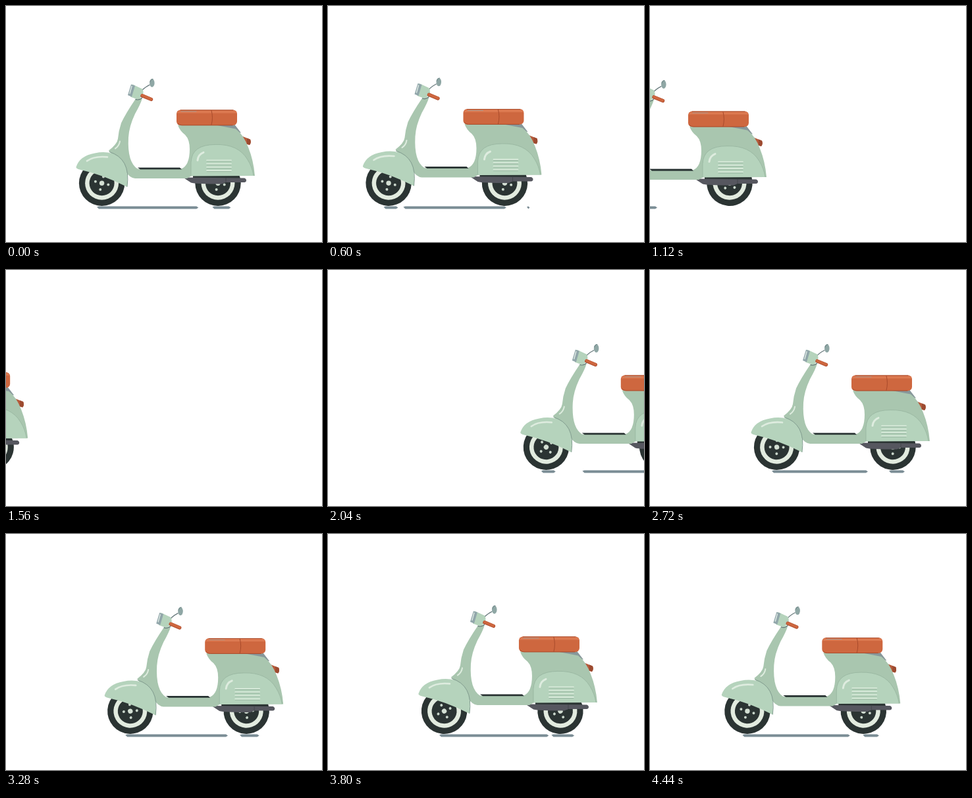
Write an HTML page that moves like this. It is 480x360 px and loops after 4.48 s.

```html
<!DOCTYPE html>
<html lang="en">
<head>
<meta charset="utf-8">
<title>Scooter</title>
<style>
  html, body { margin: 0; width: 100%; height: 100%; overflow: hidden; background: #fff; }
  svg { display: block; width: 100%; height: 100%; }
</style>
</head>
<body>
<svg viewBox="0 0 480 360">
  <defs>
    <g id="wheel">
      <circle r="34.7" fill="#2b3433"/>
      <circle r="25.5" fill="#e2ebdf"/>
      <circle r="19" fill="#2b3433"/>
      <circle r="3.7" fill="#d3dfd3"/>
      <g id="bolts" fill="#c9d6cb"></g>
    </g>
  </defs>
  <g id="scooter">
    <path id="shadow" fill="#7b8d95"/>
    <g transform="translate(145.6 270.2)"><use class="wheel" href="#wheel"/></g>
    <g transform="translate(322 270.2)"><use class="wheel" href="#wheel"/></g>
    <g id="body" fill="none" stroke-linecap="round">
      <!-- exhaust -->
      <path fill="#2b3433" d="M284 257H352V264H284Z"/>
      <path fill="#56575f" d="M269 261L281 269Q288 271 328 271L334 268.5H362Q365 268 365 265.5T362 262Z"/>
      <path stroke="#44464d" d="M334 262V268"/>
      <!-- tail light and seat base -->
      <path fill="#b65a3a" d="M356 197L371 203Q373 208 370 211.5L361 209Z"/>
      <path fill="#9c4a30" d="M366 201L371 203Q373 208 370 211.5L366 210Z"/>
      <path fill="#87979a" d="M300 180H347L357 193L330 190Z"/>
      <!-- frame -->
      <path fill="#a9c6af" d="M197 141L207 140Q205 148 196 164Q187 183 186 200Q184 238 200 248H266
        Q279 243 279 218Q279 203 272 196Q264 190 261 181H318L349 187Q361 196 368 215
        Q376 235 378 258.5H282L275 262.5H196Q188 262 180 250L156 220Q169 210 170 202
        Q171 190 175 178Q182 163 197 141Z"/>
      <path fill="#263030" d="M200 246H264L267 248.8H204Z"/>
      <!-- side cowl -->
      <path fill="#b5d3bc" d="M281 259V238Q282 211 318 211Q353 210 367 234Q374 245 376 258.5Z"/>
      <path stroke="#9bb9a3" d="M281 258V238Q282 211 318 211Q353 210 367 234Q374 245 376 258"/>
      <path stroke="#deecdf" stroke-width="3" d="M291 235Q292 226 300 223"/>
      <g id="louvers"></g>
      <!-- front fender -->
      <path fill="#b5d3bc" d="M106.5 245Q112 228 135 224Q158 219 173 231Q187 245 184 275.5
        Q148 257 112 249Q106 247.5 106.5 245Z"/>
      <path stroke="#829d90" d="M157 222Q173 227 180 240Q187 253 184 275"/>
      <path stroke="#deecdf" stroke-width="2.6" d="M123 236Q134 228 154 230"/>
      <path stroke="#deecdf" stroke-width="2" d="M166 217Q172 213 173 206"/>
      <!-- seat -->
      <rect x="259" y="158" width="92" height="23.7" rx="6" fill="#ce673f"/>
      <path fill="#dc7950" d="M260 163Q261 158.5 266 158.5H345Q350 159 350.5 163Z"/>
      <path stroke="#a84a2b" d="M265 158.5H345M312 159Q315 170 312 181M261 179Q263 181.5 267 181.5H344"/>
      <path stroke="#a9968b" d="M266 160.5H289"/>
      <!-- handlebar, lamp and mirror -->
      <path stroke="#65777a" stroke-width="1.2" d="M203 133Q208 125 218 120M197 142Q203 144 207 139"/>
      <ellipse cx="221.8" cy="117" rx="3.8" ry="6.3" fill="#8fa7a5"/>
      <path stroke="#6c8284" d="M219 115Q220 111 223 111"/>
      <path fill="#b5d3bc" d="M192 119L207 126Q211 133 205 139L200 142L189 138Z"/>
      <path fill="#91a6aa" d="M190 119L196 121L191 138L185 135.5Z"/>
      <path stroke="#dce8e3" stroke-width="1.5" d="M191 122L188 133"/>
      <path stroke="#ad4b2d" stroke-width="5.4" d="M207 136.3L220.5 142"/>
      <path stroke="#ce673f" stroke-width="4" d="M207 136L220.5 141.7"/>
    </g>
  </g>
</svg>
<script>
const LOOP = 4480, STEP = 40, RADIUS = 34.7, EXIT = 1720;
const $ = id => document.getElementById(id);
const scooter = $('scooter'), body = $('body'), shadow = $('shadow');
const wheels = document.querySelectorAll('.wheel');

const clamp = v => Math.min(1, Math.max(0, v));
const ease = v => (1 - Math.cos(Math.PI * clamp(v))) / 2;

function add(parent, tag, attributes) {
  const node = document.createElementNS('http://www.w3.org/2000/svg', tag);
  for (const name in attributes) node.setAttribute(name, attributes[name]);
  parent.append(node);
}

// Pulls away smoothly to a constant speed.
function leaving(t) {
  const ramp = 170, distance = time => ramp * Math.log(1 + Math.exp((time - 507) / ramp));
  return -0.33 * (distance(t) - distance(0));
}

// Brakes on entry, then creeps on to the starting place.
function arriving(t) {
  const braking = (Math.max(0, 2590 - t) / 64.4) ** 2.3;
  const creep = clamp((t - 2720) / (LOOP - 2720)) ** 2.2;
  return braking + 47 * (1 - creep);
}

const position = t => t < EXIT ? leaving(t) : arriving(t);

// The suspension swings between low and high at these times.
const turns = [-440, 420, 680, 1120, 1560, 2000, 2340, 2740, 4040, 4900];
function bounce(t) {
  const i = turns.findIndex(time => time > t) - 1;
  const swing = ease((t - turns[i]) / (turns[i + 1] - turns[i]));
  return -2 + 4.6 * (i % 2 ? 1 - swing : swing);
}

function streak(from, to) {
  if (to - from < 1) return '';
  const taper = Math.min(3, (to - from) / 2);
  return `M${from} 306.5L${from + taper} 305.5H${to - taper}L${to} 307.5L${to - taper} 309.5H${from + taper}Z`;
}

// Gaps in the shadow widen and slide back with speed.
function shadowPath(t, speed) {
  const frontGap = Math.max(0, 80 * (speed - 0.1));
  const rearGap = 18 + 14 * Math.cos(4 * Math.PI * (t - 2720) / LOOP);
  const middle = 300 + 200 * speed;
  const shrink = t < EXIT ? 160 * ease((t - 600) / 520) : 0;
  const end = 340 + 100 * speed - shrink;
  const split = Math.min(end, middle - rearGap / 2);
  const front = frontGap ? streak(138, 160) + streak(160 + frontGap, split) : streak(138, split);
  return front + streak(middle + rearGap / 2, end);
}

function draw(t) {
  const x = position(t);
  const speed = Math.abs(x - position(t - STEP)) / STEP;
  scooter.setAttribute('transform', `translate(${x} 0)`);
  body.setAttribute('transform', `translate(0 ${bounce(t)})`);
  wheels.forEach(w => w.setAttribute('transform', `rotate(${x / RADIUS * 180 / Math.PI})`));
  shadow.setAttribute('d', shadowPath(t, speed));
}

for (let i = 0; i < 4; i++) {
  const angle = 0.24 + i * Math.PI / 2;
  add($('bolts'), 'circle', { cx: 10 * Math.cos(angle), cy: 10 * Math.sin(angle), r: 2 });
  const y = 235 + i * 5.2;
  add($('louvers'), 'path', { d: `M305 ${y + 1.6}H342`, stroke: '#95b49e' });
  add($('louvers'), 'path', { d: `M305 ${y}H342`, stroke: '#d9ebdb', 'stroke-width': 1.8 });
}

const start = performance.now();
function tick() {
  const t = (performance.now() - start) % LOOP;
  draw(Math.floor(t / STEP) * STEP);
  requestAnimationFrame(tick);
}
draw(0);
requestAnimationFrame(tick);
</script>
</body>
</html>
```
